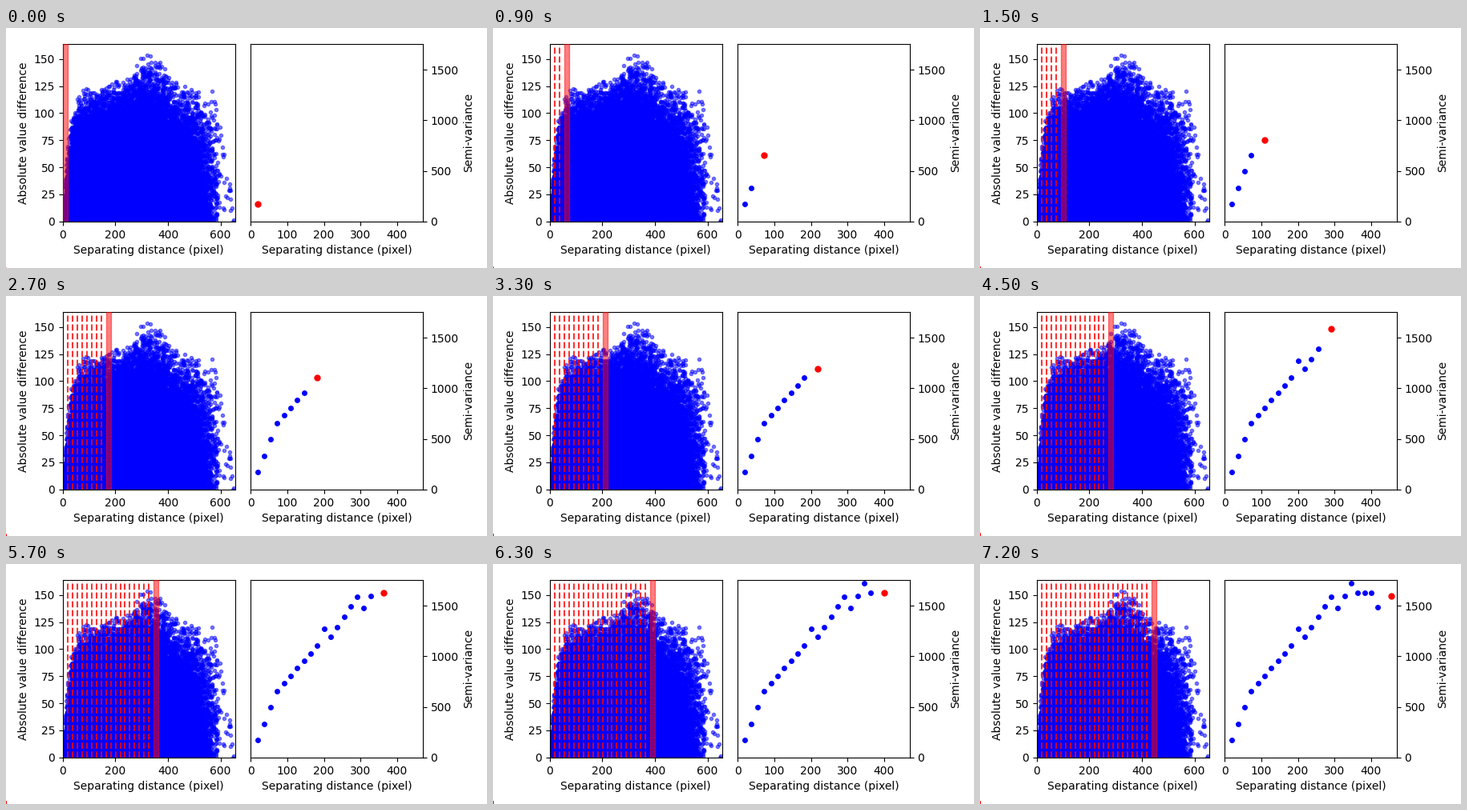
These frames come from a looping animation (600 by 300 pixels, 7.5 s). A matplotlib script:

```python
import numpy as np
import matplotlib.pyplot as plt
from matplotlib.animation import FuncAnimation
from matplotlib.patches import Rectangle

W, H, DPI = 600, 300, 100
STEPS = 25
RANK = np.arange(1, STEPS + 1)
LAGS = 18.2 * RANK

# Semi-variance: straight runs between the turning points of the curve
TURNS = [(1, 172), (4, 656), (10, 1106), (11, 1272), (12, 1193), (16, 1589),
         (17, 1478), (19, 1723), (20, 1630), (22, 1627), (23, 1486), (25, 1594)]
GAMMA = np.interp(RANK, *zip(*TURNS))

plt.rcParams.update({"font.family": "DejaVu Sans", "font.size": 10})


def rim(x):
    """Largest value difference at a distance: steep rise, hump, final drop."""
    rise = 130 * (1 - np.exp(-x / 22))
    hump = 28 * np.exp(-((x - 330) / 90) ** 2)
    return (rise + hump) * np.clip((660 - x) / 90, 0, 1)


def make_cloud(n=34000, tail=45, seed=4):
    """Pairwise differences, thinning out towards the rim and the far end."""
    rng = np.random.default_rng(seed)
    near = 600 * rng.beta(1.6, 2.3, n)
    far = 560 + 90 * rng.random(tail)
    x = np.concatenate([near, far])
    fill = np.concatenate([1 - rng.random(n) ** 0.4, rng.random(tail)])
    return x, rim(x) * fill


def make_axes(left, width, xlim, ylim):
    ax = fig.add_axes([left / W, 58.2 / H, width / W, 221.8 / H])
    ax.set(xlim=(0, xlim), ylim=(0, ylim), xlabel="Separating distance (pixel)")
    return ax


fig = plt.figure(figsize=(W / DPI, H / DPI), dpi=DPI, facecolor="white")

pairs = make_axes(70.9, 214.8, 655, 163.9)
pairs.set_ylabel("Absolute value difference")
pairs.set_xticks(range(0, 601, 200))
pairs.set_yticks(range(0, 151, 25))

vario = make_axes(305.2, 214.6, 470, 1755)
vario.set_ylabel("Semi-variance")
vario.set_xticks(range(0, 401, 100))
vario.set_yticks(range(0, 1501, 500))
vario.yaxis.tick_right()
vario.yaxis.set_label_position("right")

pairs.plot(*make_cloud(), "b.", alpha=0.5, zorder=1)
band = pairs.axvspan(0, LAGS[0], color="red", alpha=0.5, zorder=3)
bounds = [pairs.axvline(lag, color="red", ls="--", lw=1.5, alpha=0.8)
          for lag in LAGS]
past, = vario.plot([], [], "bo", ms=4)
current, = vario.plot([], [], "ro", ms=5)

# Thin red sliver in the lower left corner, rising with the semi-variance
sliver = Rectangle((0, 0), 1, 0, color="red", lw=0, transform=None, snap=False)
fig.add_artist(sliver)


def update(i):
    done = max(i - 1, 0)
    start = LAGS[i - 1] if i else 0
    band.set_x(start)
    band.set_width(LAGS[i] - start)
    for k, line in enumerate(bounds):
        line.set_visible(k < done)
    past.set_data(LAGS[:done], GAMMA[:done])
    current.set_data([LAGS[i]], [GAMMA[i]])
    sliver.set_height(0.0024 * GAMMA[i])
    return band, past, current, sliver, *bounds


anim = FuncAnimation(fig, update, frames=STEPS, interval=300,
                     repeat=True, repeat_delay=0, blit=False)
plt.show()
```
